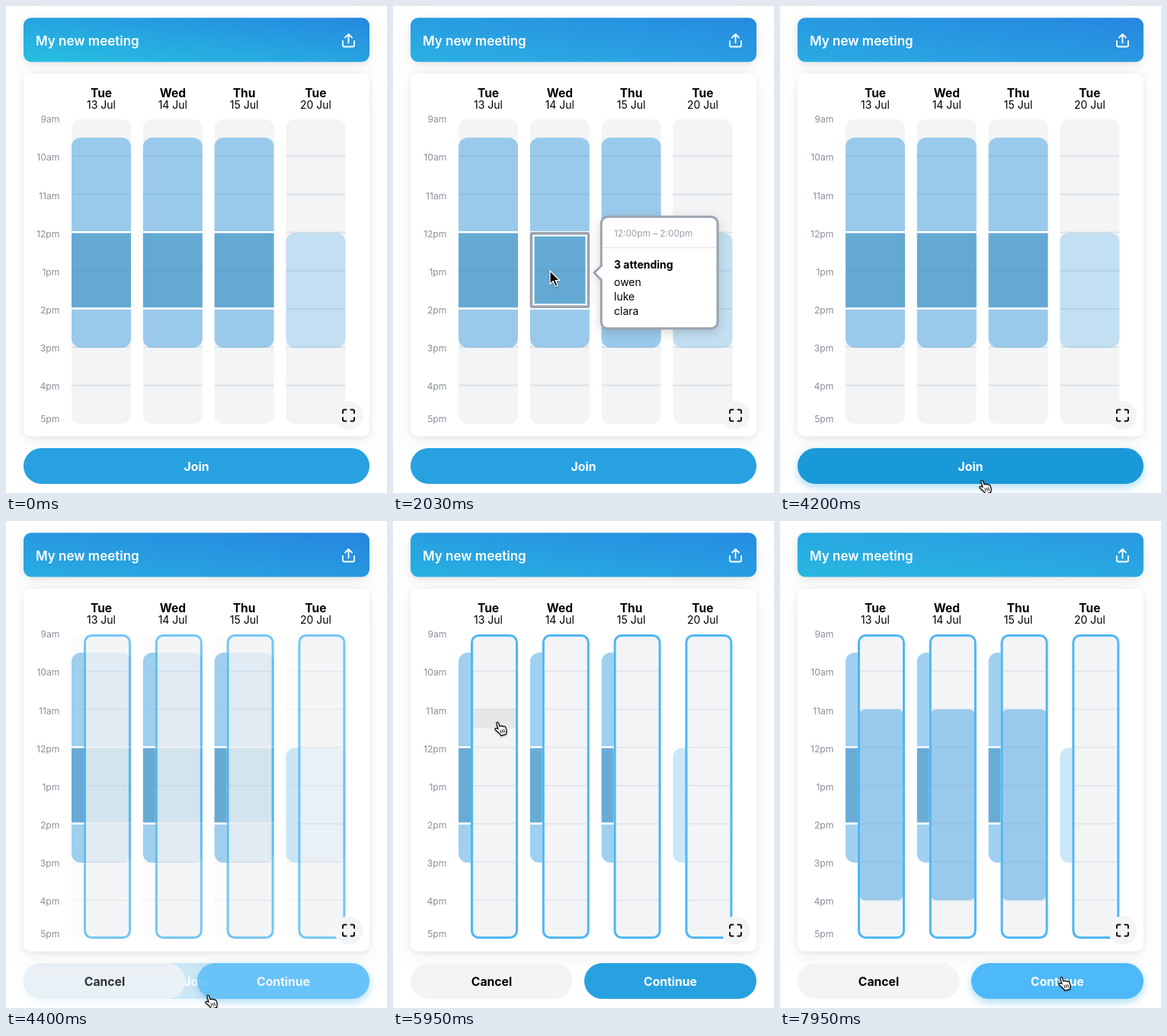
Recreate the animation shown at these times as an HTML page. Size 500 by 640 pixels, loop 8000 ms.

```html
<!DOCTYPE html>
<html lang="en">
<head>
<meta charset="utf-8">
<title>Meeting planner</title>
<style>
html, body { margin: 0; width: 100%; height: 100%; overflow: hidden; background: #fff; }
svg { display: block; width: 500px; height: 640px; font-family: Inter, Roboto, sans-serif; }
.card { filter: drop-shadow(0 2px 4px rgba(0,0,0,.08)) drop-shadow(0 8px 14px rgba(0,0,0,.05)); }
.line { fill: none; stroke-linecap: round; stroke-linejoin: round; }
.glow { filter: drop-shadow(0 10px 12px rgba(39,161,224,.45)); }
.pop { filter: drop-shadow(0 4px 7px rgba(0,0,0,.16)); }
.btn { font-size: 15.7px; font-weight: 700; text-anchor: middle; }
.mouse { filter: drop-shadow(0 1px 1px rgba(0,0,0,.3)); }
</style>
</head>
<body>
<svg id="stage" viewBox="0 0 500 640">
  <defs>
    <linearGradient id="sky" x1="0" y1="1" x2="1" y2="0">
      <stop id="skyA" offset="0"/><stop id="skyB" offset="1"/>
    </linearGradient>
  </defs>
  <rect class="card" x="23" y="15.5" width="454" height="58" rx="10" fill="url(#sky)"/>
  <text x="39" y="51.5" font-size="17" font-weight="600" fill="#fff">My new meeting</text>
  <path class="line" stroke="#fff" stroke-width="1.8" d="M442 46v5.5a2 2 0 0 0 2 2h11a2 2 0 0 0 2-2V46M449.5 48.500V37.500M445 41.500l4.500-4.500 4.500 4.500"/>
  <rect class="card" x="23" y="89" width="454" height="476.500" rx="9" fill="#fff"/>
  <g id="labels"></g>
  <g id="view"></g>
  <g id="busy"></g>
  <g id="viewLines" stroke="#5b7890" stroke-opacity=".14" stroke-width="2"></g>
  <g id="focus">
    <rect x="184.300" y="301.500" width="69.500" height="91" fill="none" stroke="#fff" stroke-width="2.500"/>
    <rect x="181.500" y="298.700" width="75" height="96.600" rx="1" fill="none" stroke="#9ca3af" stroke-width="3.500"/>
  </g>
  <g id="edit"></g>
  <g>
    <circle cx="449.500" cy="538" r="18.800" fill="#f3f4f6"/>
    <path class="line" stroke="#111" stroke-width="2" d="M442 535v-2.500a2 2 0 0 1 2-2h2.500M452.500 530.500h2.500a2 2 0 0 1 2 2v2.500M457 541v2.500a2 2 0 0 1-2 2h-2.500M446.500 545.500h-2.500a2 2 0 0 1-2-2V541"/>
  </g>
  <g id="joinBox">
    <rect id="join" x="23" y="581" width="454" height="47" rx="23.500"/>
    <text class="btn" x="250" y="610.800" fill="#fff">Join</text>
  </g>
  <g id="editBox">
    <rect x="23" y="581" width="212.500" height="47" rx="23.500" fill="#f3f4f6"/>
    <text class="btn" x="129.500" y="610.800">Cancel</text>
    <rect id="next" x="251" y="581" width="226" height="47" rx="23.500"/>
    <text class="btn" x="364" y="610.800" fill="#fff">Continue</text>
  </g>
  <g id="popup" class="pop">
    <rect x="273.300" y="277" width="152.700" height="146.800" rx="8.500" fill="#fff" stroke="#9ca3af" stroke-width="3"/>
    <path d="M275 341.500L264 350.500 275 360z" fill="#fff"/>
    <path class="line" d="M273.300 341.500L264 350.500 273.300 360" stroke="#9ca3af" stroke-width="3"/>
    <path d="M275 317.500H424.500" stroke="#e5e7eb" stroke-width="1.500"/>
    <text x="290" y="303" font-size="11.800" fill="#9aa1ac">12:00pm – 2:00pm</text>
    <text x="290" y="345" font-size="14" font-weight="700">3 attending</text>
    <text x="290" y="367.500" font-size="14">owen</text>
    <text x="290" y="386.500" font-size="14">luke</text>
    <text x="290" y="405.500" font-size="14">clara</text>
  </g>
  <g id="arrow" class="mouse">
    <path d="M0 0V17.500L4.100 13.700 7 20.500 10 19.200 7.200 12.700H12.800Z" stroke="#fff" stroke-width="1.300"/>
  </g>
  <g id="hand" class="mouse">
    <path class="line" style="fill:#fff" stroke="#111" stroke-width="1.300" d="M5 10.500L2.900 3.200C2.500 1.200 4.900.7 5.500 2.500L7 7C7.400 6 9.200 5.900 9.700 7 10.200 6.200 11.800 6.300 12.300 7.400 13 6.800 14.400 7.200 14.800 8.400L16 12C16.400 14 15.600 15 15.500 17.400L8.700 19C8 17 5 15 3.400 13.200 1 11.500.6 10.600 1 10 2 8.800 4 9.800 5 10.500Z"/>
    <path class="line" stroke="#111" d="M8 12l.9 3.500M10.300 11.600l.9 3.500M12.600 11.200l.8 3.500"/>
  </g>
</svg>
<script>
const LOOP = 8000, TOP = 147, SLOT = 25.1, PITCH = 93.8;
const $ = id => document.getElementById(id);
const colX = i => 86 + PITCH * i;
const hourY = h => TOP + SLOT * 2 * h;

function add(parent, tag, attrs, text) {
  const el = document.createElementNS('http://www.w3.org/2000/svg', tag);
  for (const k in attrs) el.setAttribute(k, attrs[k]);
  if (text) el.textContent = text;
  parent.appendChild(el);
  return el;
}
function set(el, attrs) { for (const k in attrs) el.setAttribute(k, attrs[k]); }
const fade = (el, o) => el.setAttribute('opacity', o);

// Static grid
['9am', '10am', '11am', '12pm', '1pm', '2pm', '3pm', '4pm', '5pm'].forEach((s, i) =>
  add($('labels'), 'text', { x: 70.5, y: i == 8 ? 546.5 : 153.3 + 50.1 * i, 'font-size': 12.2,
    'text-anchor': 'end', fill: '#8a909b' }, s));

const LIGHT = 'rgba(45,151,222,.45)', DARK = 'rgba(46,140,199,.72)', PALE = 'rgba(39,161,225,.24)';
const days = [['Tue', '13 Jul'], ['Wed', '14 Jul'], ['Thu', '15 Jul'], ['Tue', '20 Jul']];
const cols = days.map(([day, date], i) => {
  const x = colX(i), mid = x + 39;
  const label = (y, size, weight, s) => add($('labels'), 'text',
    { x: mid, y, 'font-size': size, 'font-weight': weight, 'text-anchor': 'middle' }, s);
  label(119.5, 15.5, 700, day);
  label(135, 14, 400, date);
  add($('view'), 'rect', { x, y: 149, width: 78, height: 400, rx: 11, fill: '#f3f4f6' });

  const busy = $('busy');
  if (i < 3) {
    add(busy, 'path', { d: `M${x} 296V185a12 12 0 0 1 12-12h54a12 12 0 0 1 12 12V296z`, fill: LIGHT });
    add(busy, 'path', { d: `M${x} 398.700V437a12 12 0 0 0 12 12h54a12 12 0 0 0 12-12V398.700z`, fill: LIGHT });
    add(busy, 'rect', { x, y: 298.2, width: 78, height: 98.2, fill: DARK });
    for (const y of [296, 396.4]) add(busy, 'rect', { x, y, width: 78, height: 2.3, fill: '#fff' });
  } else {
    add(busy, 'rect', { x, y: 298, width: 78, height: 151, rx: 12, fill: PALE });
  }
  for (let h = 1; h < 8; h++) {
    if (i < 3 && (h == 3 || h == 5)) continue;
    add($('viewLines'), 'path', { d: `M${x} ${hourY(h)}h78` });
  }

  const g = add($('edit'), 'g', {});
  add(g, 'rect', { x: x + 16, y: 149, width: 62, height: 400, rx: 10, fill: '#f3f4f6' });
  for (let h = 1; h < 8; h++)
    add(g, 'path', { d: `M${x + 18} ${hourY(h)}h58`, stroke: '#e5e7eb', 'stroke-width': 2 });
  const hover = add(g, 'rect', { x: x + 18, width: 58, height: SLOT, fill: '#000', 'fill-opacity': .055 });
  const done = add(g, 'rect', { x: x + 17, y: hourY(2), width: 60, height: SLOT * 10, rx: 9, fill: LIGHT });
  add(g, 'rect', { x: x + 17.5, y: 150.5, width: 59, height: 397, rx: 9, fill: 'none',
    stroke: '#4fb7f5', 'stroke-width': 3 });
  return { g, hover, done };
});
cols.forEach((c, i) => {
  c.drag = add($('edit'), 'rect', { class: 'glow', x: colX(i) + 17.5, y: hourY(2) + 1.5, width: 59,
    rx: 9, fill: 'rgba(43,158,226,.62)', stroke: '#0b87c6', 'stroke-width': 3.3 });
});

// Motion tables
const path = [ // time, x, y, eased
  [1200, 262, 606], [1500, 245, 520], [1750, 215, 400], [1950, 206, 348],
  [3380, 206, 348], [3700, 265, 623, 1], [4880, 265, 623], [5000, 204, 495],
  [5300, 170, 360], [5700, 140, 275], [5950, 137, 264], [6150, 137, 264],
  [6850, 334, 476, 1], [7350, 334, 476], [7900, 369, 599, 1]];
const sky = [ // time, lower left, upper right
  [0, '27c0e0', '2588e0'], [2030, '2bb0e3', '268ae0'], [4200, '2aabe2', '2686e0'],
  [5000, '27b2e2', '2683de'], [5950, '28b1e1', '268be2'], [6850, '25b6df', '2a92e4'],
  [8000, '27b8e0', '2a98e2']];
const BASE = '27a1e0', HOVER = '4db9fa', PRESS = '1a99d8';

const ramp = (t, a, b) => Math.min(1, Math.max(0, (t - a) / (b - a)));
const smooth = k => k * k * (3 - 2 * k);
const lerp = (a, b, k) => a + (b - a) * k;
const rgb = s => [0, 2, 4].map(i => parseInt(s.slice(i, i + 2), 16));
function mix(a, b, k) {
  const p = rgb(a), q = rgb(b);
  return `rgb(${p.map((v, i) => Math.round(lerp(v, q[i], k)))})`;
}
function segment(table, t) {
  let i = 1;
  while (i < table.length - 1 && table[i][0] < t) i++;
  return [table[i - 1], table[i], ramp(t, table[i - 1][0], table[i][0])];
}
function pointer(t) {
  const [a, b, k] = segment(path, t), e = b[3] ? smooth(k) : k;
  return [lerp(a[1], b[1], e), lerp(a[2], b[2], e)];
}
function paint(btn, color, lift) {
  btn.setAttribute('fill', color);
  btn.style.filter = `drop-shadow(0 4px 6px rgba(39,161,224,${.4 * lift}))`;
}

function render(t) {
  const [s0, s1, sk] = segment(sky, t);
  $('skyA').setAttribute('stop-color', mix(s0[1], s1[1], sk));
  $('skyB').setAttribute('stop-color', mix(s0[2], s1[2], sk));

  const [x, y] = pointer(t);
  const editing = smooth(ramp(t, 4220, 4480));
  fade($('view'), 1 - editing);
  fade($('viewLines'), 1 - editing);
  fade($('edit'), editing);

  fade($('focus'), t >= 1850 && t < 3420 ? 1 : 0);
  fade($('popup'), ramp(t, 1850, 2020) * (1 - ramp(t, 3400, 3580)));

  // Buttons
  const over = ramp(t, 1180, 1230) * (1 - ramp(t, 1300, 1450)) * .5 + ramp(t, 3580, 3700);
  paint($('join'), t >= 4150 ? PRESS_COLOR : mix(BASE, HOVER, over), over);
  const next = 1 - ramp(t, 5000, 5250) + ramp(t, 7750, 7930);
  paint($('next'), mix(BASE, HOVER, next), next);
  fade($('joinBox'), 1 - editing);
  fade($('editBox'), editing);

  // Slots
  const dragging = t >= 6150 && t < 7170;
  const col = Math.floor((x - 86) / PITCH), row = Math.floor((y - TOP) / SLOT);
  const inside = x - colX(col) > 16 && x - colX(col) < 78 && row < 16 && t > 5050;
  cols.forEach((c, i) => {
    fade(c.hover, inside && i == col ? 1 : 0);
    c.hover.setAttribute('y', TOP + SLOT * row);
    fade(c.done, t >= 7170 && i < 3 ? 1 : 0);
    fade(c.drag, dragging && i <= col ? 1 : 0);
    if (dragging) set(c.drag, { height: Math.max(1, row - 3) * SLOT - 2.5 });
  });

  // Pointer
  const hand = t > 4200 || y > 581;
  fade($('arrow'), t >= 1200 && !hand ? 1 : 0);
  fade($('hand'), t >= 1200 && hand ? 1 : 0);
  $('arrow').setAttribute('transform', `translate(${x} ${y})`);
  $('hand').setAttribute('transform', `translate(${x - 4} ${y - 1})`);
}
const PRESS_COLOR = '#' + PRESS;

const start = performance.now();
function tick() {
  render((performance.now() - start) % LOOP);
  requestAnimationFrame(tick);
}
tick();
</script>
</body>
</html>
```
